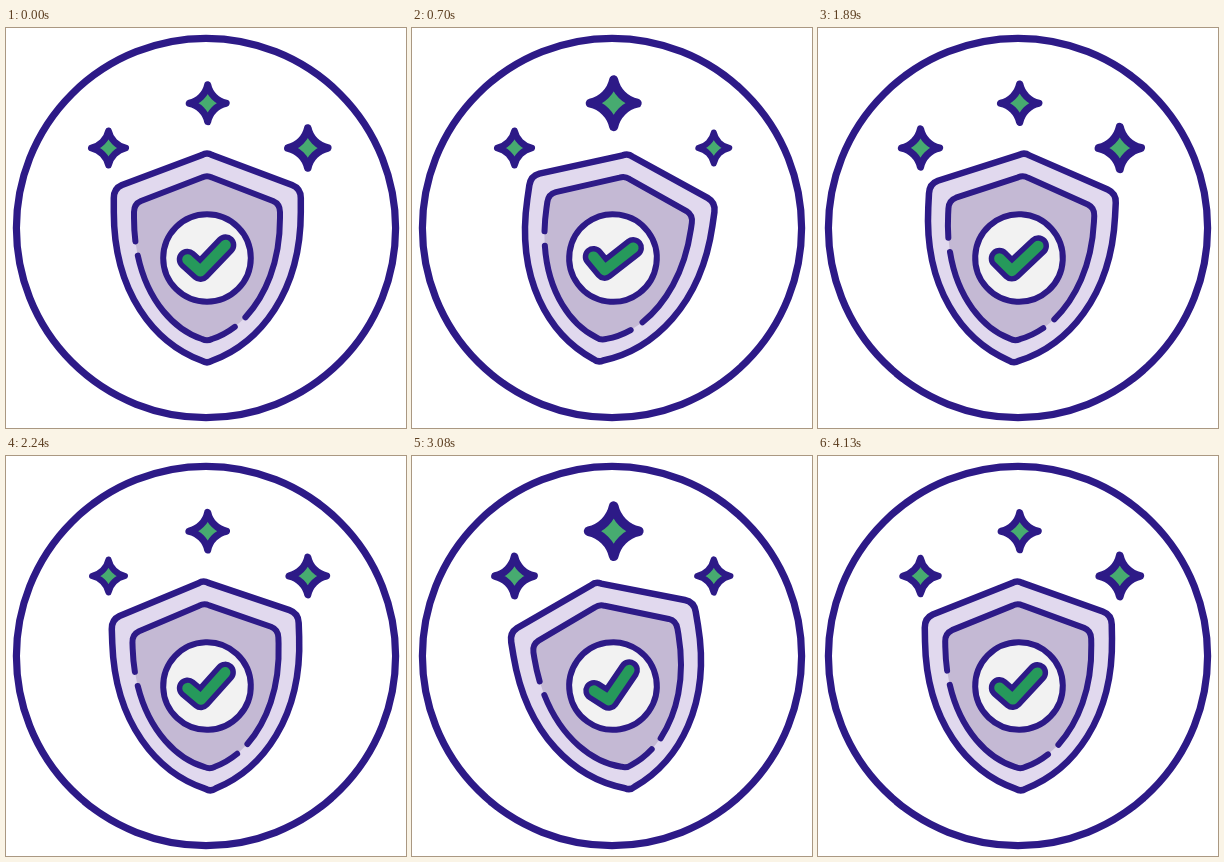
Animation of 400x400 px, one loop 4.2 s. Source, as an HTML page:

```html
<!DOCTYPE html>
<html lang="en">
<head>
<meta charset="utf-8">
<title>Shield</title>
<style>
  html, body { margin: 0; width: 100%; height: 100%; overflow: hidden; background: #fff; }
  svg { display: block; width: 100vw; height: 100vh; }
  .line { stroke: #2d1a87; stroke-width: 6; stroke-linecap: round; stroke-linejoin: round; fill: none; }
  .check { fill: none; stroke-linecap: round; stroke-linejoin: round; }
</style>
</head>
<body>
<svg viewBox="0 0 400 400">
  <defs>
    <!-- Unit star: reaches 1 in each direction, outline included -->
    <path id="star" d="M0-.84C.09-.42 .42-.09 .84 0C.42 .09 .09 .42 0 .84C-.09 .42-.42 .09-.84 0C-.42-.09-.09-.42 0-.84Z"
      fill="#47ab70" stroke="#2d1a87" stroke-width=".32" stroke-linejoin="round"/>
  </defs>
  <circle class="line" cx="200" cy="200" r="189.6" style="stroke-width:7.2"/>
  <g id="stars"></g>
  <g id="shield">
    <path class="line" style="fill:#e1d9ee;stroke-width:6.5" d="M196 127Q201 124 206 127L286 157Q294.8 160.5 294.8 170V184
      C294.8 264 254 315 206 332.8Q201 336 196 332.8C148 315 107.8 264 107.8 184V170Q107.8 160.5 116 157Z"/>
    <path fill="#c4b9d4" d="M196 149.5Q201 147 206 149.5L267 173Q274 176 274 184V190
      C274 258 240 300 206 311Q201 313.5 196 311C162 300 128 258 128 190V184Q128 176 135 173Z"/>
    <path class="line" d="M129.4 213.4C128.5 206 128 198.2 128 190V184Q128 176 135 173L196 149.5
      Q201 147 206 149.5L267 173Q274 176 274 184V190C274 234.6 259.2 268 239.4 289.4
      M228.8 298.8C222 304 214 308.4 206 311Q201 313.5 196 311C168.8 302.2 141.6 273.6 131.8 227.6"/>
    <circle class="line" cx="201" cy="230" r="43.8" style="fill:#f2f2f2"/>
    <path class="check" stroke="#2d1a87" stroke-width="21.5" d="M181.5 231.5L194.5 243.2L219.6 217"/>
    <path class="check" stroke="#26995b" stroke-width="10.6" d="M181.5 231.5L194.5 243.2L219.6 217"/>
  </g>
</svg>
<script>
  const LOOP = 4200, STEP = 70, PULSE = LOOP / 2;
  const SWING = 9.5; // degrees

  const stars = [
    { x: 201.7, y: 75.2, size: 26, swell: 4, delay: 0 },
    { x: 102.5, y: 120, size: 22.3, swell: 3.5, delay: PULSE / 6 },
    { x: 301.8, y: 120, size: 22, swell: 3.5, delay: PULSE / 3 }
  ];
  const shield = document.getElementById('shield');
  const group = document.getElementById('stars');

  for (const star of stars) {
    star.node = document.createElementNS('http://www.w3.org/2000/svg', 'use');
    star.node.setAttribute('href', '#star');
    group.append(star.node);
  }

  const turn = (t, period) => 2 * Math.PI * t / period;

  function draw(now) {
    const t = Math.floor((now % LOOP) / STEP) * STEP;
    shield.setAttribute('transform', `rotate(${SWING * Math.sin(turn(t, LOOP))} 201 230)`);
    for (const { node, x, y, size, swell, delay } of stars) {
      const scale = size - swell * Math.cos(turn(t - delay, PULSE));
      node.setAttribute('transform', `translate(${x} ${y}) scale(${scale})`);
    }
  }

  const start = performance.now();
  function tick() {
    draw(performance.now() - start);
    requestAnimationFrame(tick);
  }
  tick();
</script>
</body>
</html>
```
